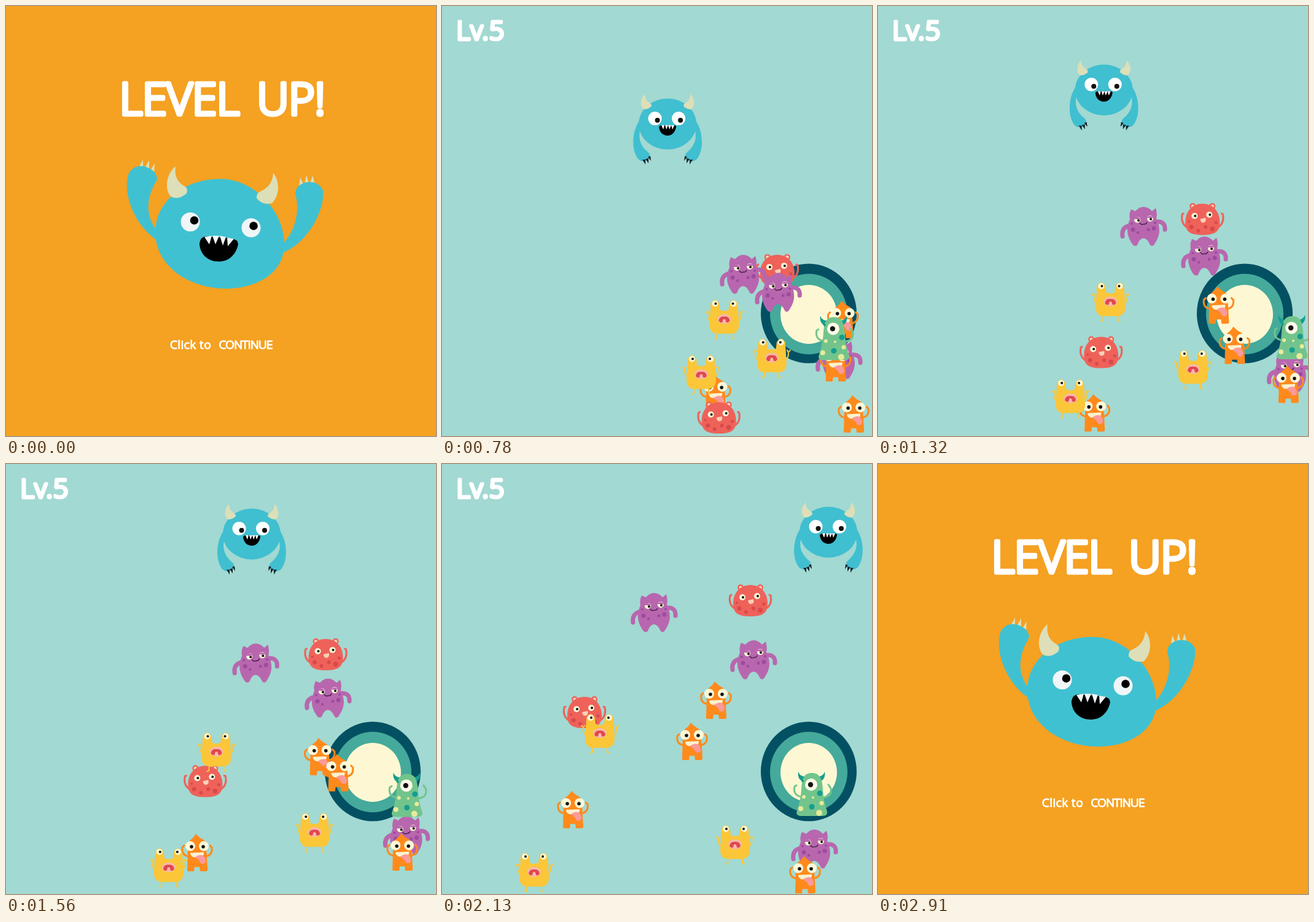
Write an HTML page that moves like this. It is 700 px wide and 700 px high and loops after 2940 ms.

```html
<!DOCTYPE html>
<html lang="en">
<head>
<meta charset="utf-8">
<title>Level up</title>
<style>
html, body { margin: 0; height: 100%; overflow: hidden; background: #a2d9d2; }
svg { display: block; width: 100vw; height: 100vh; }
text { font-family: "Open Sans", "Noto Sans", sans-serif; font-weight: 300; fill: #fff; stroke: #fff; stroke-linejoin: round; }
.arm { fill: none; stroke-linecap: round; }
</style>
</head>
<body>
<svg viewBox="0 0 700 700">
  <g id="game">
    <rect width="700" height="700" fill="#a2d9d2"/>
    <ellipse cx="597" cy="500.500" rx="78" ry="81" fill="#045063"/>
    <ellipse cx="597" cy="501.500" rx="63" ry="65.500" fill="#45aa9b"/>
    <ellipse cx="597" cy="502" rx="46" ry="48" fill="#fdf8d3"/>
    <g id="crowd"></g>
    <g id="player"></g>
    <text x="23.500" y="54.500" font-size="43" stroke-width="5" letter-spacing="1">Lv.5</text>
  </g>
  <g id="card">
    <rect width="700" height="700" fill="#f5a122"/>
    <text y="176.500" font-size="72" stroke-width="6.500"><tspan x="185">LEVEL</tspan><tspan x="408.500">UP!</tspan></text>
    <g fill="#dcdfb8">
      <path d="M216 263L223 250L223 264ZM226 264L233 251L233 266ZM235 268L242 256L241 272Z"/>
      <path d="M477 293L479 279L484 290ZM486 290L489 275L493 289ZM495 289L499 276L503 290Z"/>
    </g>
    <g fill="#40c1d1">
      <path d="M349 281.500C405 281.500 453 335 453 388C453 435 408 460 358 460C300 460 243 425 243 368C243 318 290 281.500 349 281.500Z"/>
      <path d="M245 381C207 355 189 302 200 272Q208 258 225 261Q246 267 246 283C233 303 228 326 235 346Q239 358 247 366Z"/>
      <path d="M446 403C486 392 520 335 516 300Q508 284 488 287Q471 292 471 306C478 330 474 362 450 388Z"/>
    </g>
    <g fill="#dcdfb8">
      <path d="M276 261C262 272 257 296 268 310Q280 317 294 305Q297 296 290 293C278 286 274 275 276 261Z"/>
      <path d="M435 272C446 285 446 308 433 321Q418 325 408 313Q407 305 414 302C428 296 434 286 435 272Z"/>
    </g>
    <g fill="#f0f6f8"><circle cx="300" cy="351.500" r="15.500"/><circle cx="399" cy="361" r="15.500"/></g>
    <circle cx="306.500" cy="349" r="6.800"/><circle cx="403" cy="358" r="6.800"/>
    <path d="M315 386Q317 374 328 375L366 378Q378 380 378 388C374 406 362 416 346 416C328 416 315 403 315 386Z"/>
    <path fill="#f0f6f8" d="M323 376L335 374L331 388ZM336 374L347 374L341 388ZM348 374L358 376L353 390ZM360 377L371 379L361 391Z"/>
    <text y="558" font-size="19" stroke-width="1.600"><tspan x="267" letter-spacing=".8">Click to</tspan><tspan x="346.500" letter-spacing="-.6">CONTINUE</tspan></text>
  </g>
</svg>
<script>
const LOOP = 2940, STEP = 30, REF = 2130, LOW = 20, HIGH = 680;
const $ = id => document.getElementById(id);
const dot = (x, y, r, fill) => `<circle cx="${x}" cy="${y}" r="${r}" fill="${fill}"/>`;
const shape = (d, fill) => `<path d="${d}" fill="${fill}"/>`;
const line = (d, color, w) => `<path class="arm" d="${d}" stroke="${color}" stroke-width="${w}"/>`;
const pair = s => s + `<g transform="scale(-1 1)">${s}</g>`;
const eye = (x, y, r, dx, dy, p, white = '#fbf8d8') => dot(x, y, r, white) + dot(x + dx, y + dy, p, '#111');
const dots = (fill, ...list) => list.map(([x, y, r]) => dot(x, y, r, fill)).join('');

const art = {
  blue:
    '<ellipse rx="47" ry="41.5" fill="#40bfd0"/>' +
    pair(shape('M-42 -10C-59 8 -60 44 -47 58Q-39 64 -31 56Q-26 50 -33 45C-43 36 -49 24 -44 8Z', '#40bfd0') +
      shape('M-41 58L-36 66L-36 58ZM-36 57L-31 64L-31 56ZM-32 54L-27 60L-28 52Z', '#16242c') +
      shape('M-37 -49C-45 -40 -45 -29 -39 -24Q-32 -23 -26 -29Q-26 -33 -30 -35C-35 -38 -37 -42 -37 -49Z', '#dcdfb8')) +
    eye(-20.5, -9, 11, 4, 3, 4, '#fff') + eye(18, -9, 11, 3, 3, 4, '#fff') +
    shape('M-14 5Q-13 2 -9 2L10 2Q14 2 14 5C12 15 6 19 0 19C-7 19 -13 14 -14 5Z', '#000') +
    shape('M-10 2L-5 2L-7 9ZM-4 2L1 2L-2 9ZM1 2L6 2L3 9ZM6 2L11 2L8 9Z', '#fff'),
  purple:
    line('M-25 -1Q-36 3 -34 16', '#b867ae', 7) + line('M23 -8Q36 -8 35 5', '#b867ae', 7) +
    shape('M-22 -12Q-24 -20 -20 -28L-13 -25Q-7 -32 0 -32Q8 -32 14 -25L20 -30Q23 -21 21 -13C29 4 27 16 17 30Q14 33 11 30Q6 19 0 19Q-6 19 -10 30Q-13 33 -17 30C-27 16 -29 4 -22 -12Z', '#b867ae') +
    dots('#9c4b9f', [-17, 5, 3.5], [17, 3, 3.5], [-9, 10, 2.2], [-19, -5, 2], [8, 5, 2.5], [19, -6, 2]) +
    eye(-10, -11, 5, 2, 1, 2) + eye(11, -13, 5, 1, 1, 2) +
    shape('M-16 -12Q-11 -20 -5 -12ZM5 -14Q11 -21 17 -14Z', '#b867ae') +
    line('M-6 -6Q-3 -2 0 -4Q4 -3 6 -7', '#3a1d42', 1.3),
  red:
    pair(line('M-26 12Q-36 5 -33 -9L-31 -10', '#ee625a', 3) + dot(-16, -22, 5, '#ee625a') + dot(-16, -22, 2.6, '#fbd9b5')) +
    shape('M0 -26C18 -26 28 -12 28 4C28 20 20 25 0 25C-20 25 -28 20 -28 4C-28 -12 -18 -26 0 -26Z', '#ee625a') +
    dots('#d9494b', [-18, 12, 3.5], [-7, 18, 3], [5, 12, 3], [16, 15, 4], [22, 5, 2.5], [-22, 3, 2]) +
    eye(-13, -6, 5, 1, 0, 2) + eye(11, -8, 5, 1, 0, 2) +
    shape('M-4 -1L5 -3Q7 4 1 5Q-3 5 -4 -1Z', '#fbd0b5'),
  yellow:
    pair(line('M-22 5Q-28 1 -27 -8L-30 -11M-27 -8L-25 -11', '#fbc638', 2) + line('M-12 24L-12 32L-15 33', '#fbc638', 2)) +
    shape('M-24 10L-22 -24Q-15 -36 -8 -24L-7 -14Q0 -10 7 -14L8 -24Q15 -36 22 -24L24 10Q24 25 10 25L-10 25Q-24 25 -24 10Z', '#fbc638') +
    eye(-15, -24, 5, 1, 0, 2) + eye(15, -24, 5, -1, 0, 2) +
    '<ellipse cy="1" rx="11" ry="8" fill="#f9b8a8"/>' +
    shape('M-9 4Q-8 -4 0 -3Q8 -4 9 4Q6 8 3 6L2 2Q0 0 -2 2L-3 6Q-6 8 -9 4Z', '#e0484e'),
  orange:
    pair(line('M-13 6Q-26 4 -24 -9L-21 -12', '#ff8a1c', 3)) +
    shape('M-2 -31Q4 -24 11 -21Q15 -18 15 -8L17 27Q17 30 14 30L5 30L4 23L-4 23L-5 30L-14 30Q-17 30 -16 26L-15 -8Q-15 -18 -11 -21Q-5 -25 -2 -31Z', '#ff8a1c') +
    eye(-11, -11, 8, 2, 1, 2.8) + eye(11, -11, 8, -1, 1, 2.8) +
    shape('M-11 0L11 -1Q11 6 7 8L-6 7Q-11 5 -11 0Z', '#fbf2cf') +
    shape('M-3 7Q3 2 10 4Q17 13 12 17Q6 20 4 13Z', '#f99a9c'),
  green:
    line('M-16 4Q-31 2 -28 -13L-25 -15', '#72c48c', 3) + line('M17 5Q33 4 31 -10L27 -16', '#72c48c', 3) +
    shape('M-15 -21Q-24 -26 -22 -37Q-19 -29 -10 -29ZM14 -21Q23 -26 21 -37Q18 -29 9 -29Z', '#159d90') +
    shape('M0 -35C14 -35 17 -24 18 -8Q19 10 25 28Q26 35 17 35L-19 35Q-27 34 -24 26Q-18 8 -17 -8C-16 -24 -14 -35 0 -35Z', '#72c48c') +
    dots('#159d90', [0, 20, 4.5], [13, -2, 4.5], [-15, -22, 2]) +
    dots('#e8ea9b', [-13, 4, 3], [-18, 23, 4], [12, 30, 5], [16, 14, 3.5], [2, 5, 2]) +
    eye(-1, -16, 10, -1, 0, 4.2, '#fdfbe8')
};

// kind, x and y at REF, velocity in px per ms; back to front
const crowd = [
  ['red', 502, 223, -.0325, -.154],
  ['orange', 213, 563, -.172, -.123],
  ['yellow', 150, 663, -.2015, -.073],
  ['red', 232, 405, -.162, -.197],
  ['yellow', 477, 618, -.0443, .0345],
  ['yellow', 257, 437, -.15, -.053],
  ['purple', 507, 319, -.0298, -.109],
  ['purple', 345, 242, -.1075, -.1445],
  ['purple', 606, 627, -.08, .038],
  ['orange', 407, 452, -.182, -.0436],
  ['orange', 446, 385, -.166, -.207],
  ['orange', 591, 669, -.095, .065],
  ['green', 602, 538, -.089, -.0025]
];

// time, x, y of the player
const route = [
  [0, 386, 330], [420, 378, 233], [1110, 364, 162], [1560, 400, 114],
  [2130, 629, 111], [2300, 642, 158], [2520, 631, 228], [2940, 608, 410]
];

$('crowd').innerHTML = crowd.map(c => `<g>${art[c[0]]}</g>`).join('');
$('player').innerHTML = art.blue;
const bodies = [...$('crowd').children];
const place = (el, x, y) => el.setAttribute('transform', `translate(${x} ${y})`);

function bounce(u) {
  const v = HIGH - Math.abs(HIGH - u);
  return LOW + Math.abs(v - LOW);
}

function slope(i, k) {
  const a = route[Math.max(i - 1, 0)], b = route[Math.min(i + 1, route.length - 1)];
  return (b[k] - a[k]) / (b[0] - a[0]);
}

function along(t, k) {
  let i = 0;
  while (t >= route[i + 1][0]) i++;
  const a = route[i], b = route[i + 1], d = b[0] - a[0], s = (t - a[0]) / d, r = 1 - s;
  return r * r * (1 + 2 * s) * a[k] + s * s * (3 - 2 * s) * b[k] +
    s * r * d * (r * slope(i, k) - s * slope(i + 1, k));
}

const start = performance.now();
function draw(now) {
  const t = Math.floor(Math.max(0, now - start) % LOOP / STEP) * STEP;
  const onCard = t < STEP || t >= LOOP - STEP;
  $('card').style.display = onCard ? '' : 'none';
  $('game').style.display = onCard ? 'none' : '';
  crowd.forEach(([, x, y, vx, vy], i) =>
    place(bodies[i], bounce(x + vx * (t - REF)), bounce(y + vy * (t - REF))));
  place($('player'), along(t, 1), along(t, 2));
  requestAnimationFrame(draw);
}
draw(start);
</script>
</body>
</html>
```
